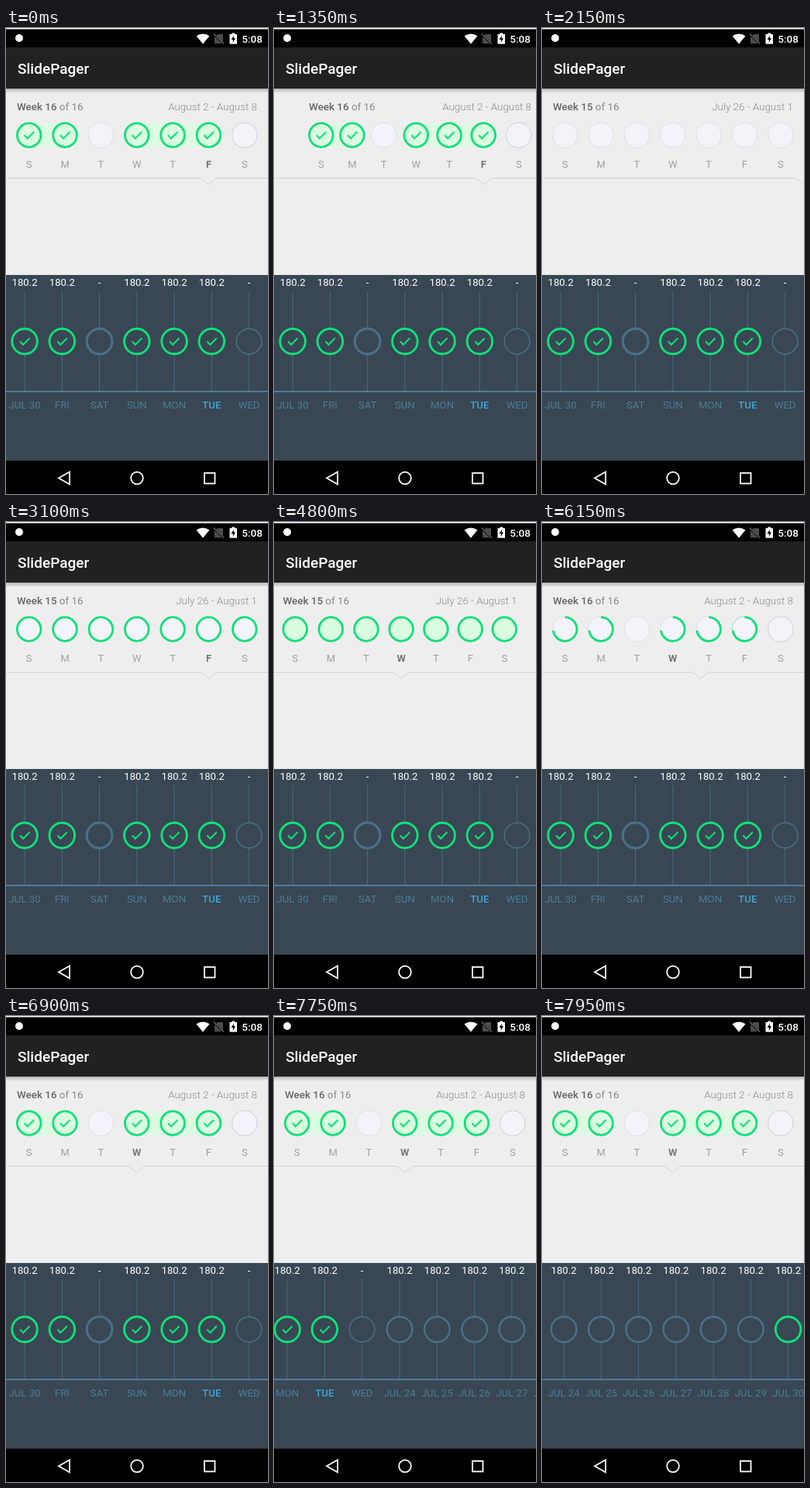
An HTML page with a canvas for the animation above (8 s loop, 338 by 600 pixels).

```html
<!DOCTYPE html>
<html lang="en">
<head>
<meta charset="utf-8">
<title>Pager</title>
<style>
html, body { margin: 0; width: 100%; height: 100%; overflow: hidden; background: #eee; }
canvas { display: block; width: 338px; height: 600px; }
</style>
</head>
<body>
<canvas id="stage"></canvas>
<script>
const W = 338, H = 600, LOOP = 8000, STEP = 50;
const GREEN = '#10e079', MINT = '#dafde1', SLATE = '#384753', BLUE = '#4a6f87';
const canvas = document.getElementById('stage');
const dpr = window.devicePixelRatio || 1;
canvas.width = W * dpr;
canvas.height = H * dpr;
const c = canvas.getContext('2d');

// Scroll tables: [time, distance]
const BACK = [[1250, 0], [1300, 2], [1400, 14], [1500, 55], [1600, 140], [1700, 235],
  [1800, 298], [1900, 328], [1980, 337], [2050, 338]];
const FORWARD = [[4750, 0], [4800, -2.5], [4850, -18], [4900, -65], [4950, -140], [5000, -220],
  [5050, -280], [5100, -315], [5150, -331], [5200, -336], [5250, -337.7], [5400, -338]];
const LOWER = [[7600, 0], [7650, -15], [7700, -90], [7750, -200], [7800, -275],
  [7850, -313], [7900, -328], [7950, -334]];

const clamp = v => Math.max(0, Math.min(1, v));
const ramp = (t, a, b) => clamp((t - a) / (b - a));
const smooth = p => (1 - Math.cos(Math.PI * p)) / 2;

function track(table, t) {
  if (t <= table[0][0]) return table[0][1];
  for (let i = 1; i < table.length; i++) {
    const [t0, v0] = table[i - 1], [t1, v1] = table[i];
    if (t <= t1) return v0 + (v1 - v0) * (t - t0) / (t1 - t0);
  }
  return table[table.length - 1][1];
}

function text(str, x, y, color, size = 13.3, weight = 400, align = 'center') {
  c.font = `${weight} ${size}px Roboto, sans-serif`;
  c.fillStyle = color;
  c.textAlign = align;
  c.fillText(str, x, y);
  return c.measureText(str).width;
}

function rect(x, y, w, h, color) {
  c.fillStyle = color;
  c.fillRect(x, y, w, h);
}

function line(points, color, width, close) {
  c.beginPath();
  points.forEach(([x, y]) => c.lineTo(x, y));
  if (close) c.closePath();
  c.strokeStyle = color;
  c.lineWidth = width;
  c.stroke();
}

function shape(points, color) {
  c.beginPath();
  points.forEach(([x, y]) => c.lineTo(x, y));
  c.fillStyle = color;
  c.fill();
}

function disc(x, y, r, color) {
  c.beginPath();
  c.arc(x, y, r, 0, Math.PI * 2);
  c.fillStyle = color;
  c.fill();
}

function ring(x, y, r, color, width, sweep = 1) {
  if (sweep <= 0) return;
  c.beginPath();
  c.arc(x, y, r, -Math.PI / 2, -Math.PI / 2 + Math.PI * 2 * sweep);
  c.strokeStyle = color;
  c.lineWidth = width;
  c.stroke();
}

const check = (x, y) => line([[x - 6, y], [x - 2, y + 4.2], [x + 6.5, y - 4.3]], GREEN, 2);

function faded(alpha, draw) {
  if (alpha <= 0) return;
  c.globalAlpha = alpha;
  draw();
  c.globalAlpha = 1;
}

// Items on the leading side of a moving page run ahead of the rest.
function shift(d, i) {
  const f = clamp(d < 0 ? i / 6 : 1 - i / 6);
  const extra = 80 * (1 - Math.exp(-3.4 * f * f * Math.abs(d) / 80));
  return d + Math.sign(d) * extra;
}

const dayX = (d, i) => 29.7 + 46.35 * i + shift(d, i);

function weekPage(d, page) {
  const { week, range, done, outline, sweep, fill, notch, selected, streaks, checks } = page;
  const left = 14 + shift(d, 0);
  const w = text('Week ' + week, left, 106, '#666', 13.4, 500, 'left');
  text(' of 16', left + w, 106, '#888', 13.4, 400, 'left');
  text(range, 324 + shift(d, 6), 106, '#8c8c8c', 13.4, 300, 'right');

  faded(fill, () => streaks.forEach(([a, b]) =>
    rect(dayX(d, a), 123, dayX(d, b) - dayX(d, a), 30, '#ddfae3')));

  [...'SMTWTFS'].forEach((letter, i) => {
    const x = dayX(d, i), y = 138;
    disc(x, y, 16.3, '#f3f4fa');
    ring(x, y, 16.3, outline[i] || '#dfe0e5', 1);
    if (done.includes(i)) {
      faded(fill, () => disc(x, y, 15, MINT));
      ring(x, y, 15.3, GREEN, 2.8, sweep);
      if (checks) faded(fill, () => check(x, y));
    }
    const on = i === selected;
    text(letter, x, 180, on ? '#777' : '#a0a0a0', 13, on ? 700 : 400);
  });
  return notch === null ? null : dayX(d, notch);
}

function weeks(t) {
  const moved = 2100, tap15 = 3700, tap16 = 5950;
  const first = t < 4700;
  const p15 = {
    week: 15, range: 'July 26 - August 1',
    done: [0, 1, 2, 3, 4, 5, 6], outline: {}, streaks: [], checks: false,
    sweep: ramp(t, 2250, 3050),
    fill: ramp(t, 3100, 3700),
    selected: t < 2200 ? -1 : t < tap15 ? 5 : 3,
    notch: t <= moved ? null
      : t < tap15 ? 6.73 - 1.73 * smooth(ramp(t, moved, moved + 350))
      : 5 - 2 * smooth(ramp(t, tap15, tap15 + 350))
  };
  const p16 = {
    week: 16, range: 'August 2 - August 8',
    done: [0, 1, 3, 4, 5], outline: { 5: '#93e3bf', 6: '#cfcfd6' },
    streaks: [[0, 1], [3, 5]], checks: true,
    sweep: first ? 1 : ramp(t, 5600, 6350),
    fill: first ? 1 : ramp(t, 6350, 6900),
    selected: t < tap16 ? 5 : 3,
    notch: 5 - 2 * smooth(ramp(t, tap16, tap16 + 350))
  };
  const d15 = first ? track(BACK, t) - W : track(FORWARD, t);
  const d16 = first ? d15 + W : d15 + W;

  const notches = [[d15, p15], [d16, p16]]
    .filter(([d]) => Math.abs(d) < W)
    .map(([d, p]) => weekPage(d, p))
    .filter(x => x !== null)
    .sort((a, b) => a - b);
  const y = 193.5, points = [[-500, y]];
  notches.forEach(x => points.push([x - 10, y], [x, y + 8], [x + 10, y]));
  points.push([900, y]);
  line(points, '#d3d3d3', 1);
}

const RECENT = ['JUL 30', 'FRI', 'SAT', 'SUN', 'MON', 'TUE', 'WED'].map((label, i) => ({
  label,
  value: i === 2 || i === 6 ? '-' : '180.2',
  done: i !== 2 && i !== 6,
  check: true,
  width: i === 6 ? 1.5 : 3.2,
  today: i === 5
}));
const EARLIER = Array.from({ length: 7 }, (_, i) => ({
  label: 'JUL ' + (24 + i), value: '180.2', done: i === 6, check: false, width: 2.5
}));

function dayPage(d, days) {
  days.forEach((day, i) => {
    const x = 24.1 + 48.25 * i + d, y = 403.5;
    text(day.value, x, 332, '#fff', 13.2);
    line([[x, 339], [x, 467]], '#4a6a7e', 1);
    disc(x, y, 16.5, SLATE);
    ring(x, y, 16.3, day.done ? GREEN : BLUE, day.done ? 2.9 : day.width);
    if (day.done && day.check) check(x, y);
    text(day.label, x, 490, day.today ? '#42a4d8' : '#4b7c98', 13.2, day.today ? 500 : 400);
  });
}

function days(t) {
  rect(0, 318, W, 239, SLATE);
  const d = track(LOWER, t);
  dayPage(d, RECENT);
  if (d < 0) dayPage(d + W, EARLIER);
  rect(0, 467, W, 2, '#52799a');
}

function chrome() {
  rect(0, 0, W, 25, '#000');
  rect(0, 0, W, 1.5, '#fff');
  rect(0, 25, W, 53, '#212121');
  const shade = c.createLinearGradient(0, 78, 0, 84);
  shade.addColorStop(0, '#b4b4b4');
  shade.addColorStop(1, '#eee');
  rect(0, 78, W, 6, shade);
  text('SlidePager', 15, 59, '#fff', 19, 500, 'left');

  disc(17, 13, 5, '#fff');
  c.beginPath();
  c.moveTo(254, 20.5);
  c.lineTo(245.5, 10.3);
  c.quadraticCurveTo(254, 4.5, 262.5, 10.3);
  c.fillStyle = '#fff';
  c.fill();
  shape([[269, 12], [273, 8], [280, 8], [280, 20], [269, 20]], '#4c4c4c');
  line([[268, 8], [281, 21]], '#000', 2.4);
  line([[268, 7.5], [281, 20.5]], '#666', 1.2);
  rect(288.5, 8, 9.5, 12.5, '#fff');
  rect(291.3, 6.5, 4, 2, '#fff');
  shape([[294, 9.5], [290.5, 15], [293, 15], [292.6, 19], [296, 13.3], [293.7, 13.3]], '#000');
  text('5:08', 331, 19, '#fff', 13.6, 500, 'right');

  rect(0, 557, W, 43, '#000');
  line([[68, 579.5], [82, 571.5], [82, 587.5]], '#fff', 1.8, true);
  ring(169, 579.5, 7.8, '#fff', 1.8);
  c.strokeRect(256, 573, 13.5, 13.5);
}

function draw(t) {
  c.setTransform(dpr, 0, 0, dpr, 0, 0);
  rect(0, 0, W, H, '#eee');
  weeks(t);
  days(t);
  chrome();
}

const start = performance.now();
function tick() {
  const t = (performance.now() - start) % LOOP;
  draw(Math.floor(t / STEP) * STEP);
  requestAnimationFrame(tick);
}
tick();
</script>
</body>
</html>
```
